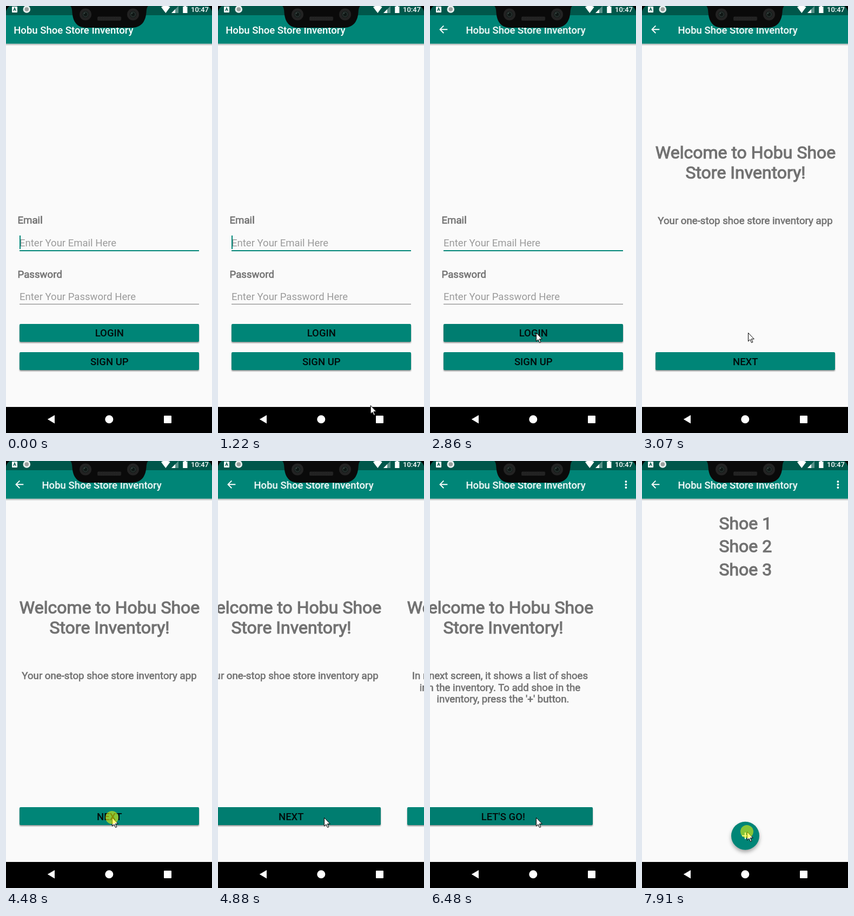
These frames come from a looping animation (381x787 px, 8000 ms). An HTML page:

```html
<!DOCTYPE html>
<html lang="en">
<head>
<meta charset="utf-8">
<title>Shoe inventory app</title>
<style>
  html, body { margin: 0; width: 100%; height: 100%; overflow: hidden; background: #fafafa; }
  svg { display: block; width: 100%; height: 100%; font: 18.54px Roboto, "Open Sans", sans-serif; }

  .bold { fill: #727272; stroke: #727272; stroke-width: .035em; font-size: 18.66px; }
  .big { font-size: 32px; }
  .mid { text-anchor: middle; }
  .hint { fill: #9b9b9b; }
  .label { fill: #020b0a; font-weight: 500; text-anchor: middle; }
  .title { fill: #fff; font-weight: 500; }
  .clock { fill: #fff; font-size: 13px; font-weight: 500; }

  .btn { fill: #008577; filter: drop-shadow(0 2px 1px rgba(0,0,0,.4)); }
  .fab { fill: #008577; filter: drop-shadow(0 4px 3.5px rgba(0,0,0,.34)); }

  .strip, .caret, .name, .back, .more, .tap { animation: 8s step-end infinite; }
  .strip { animation-name: strip; }
  .caret { animation-name: caret; }
  .name { animation-name: name; }
  .back { animation-name: back; }
  .more { animation-name: more; }
  .tap { animation-name: tap; }
  .press { opacity: 0; animation: press 8s step-end var(--at) infinite; }
  .mouse { animation: mouse 8s linear infinite; }

  @keyframes strip {
    0% { transform: translateX(0); }
    36.625% { transform: translateX(-56px); }
    37.5% { transform: translateX(-262px); }
    38.375% { transform: translateX(-381px); }
    60.875% { transform: translateX(-437px); }
    61.75% { transform: translateX(-643px); }
    62.625% { transform: translateX(-762px); }
    81% { transform: translateX(-818px); }
    81.875% { transform: translateX(-1024px); }
    82.75%, 100% { transform: translateX(-1143px); }
  }
  @keyframes caret {
    0%, 11%, 23.1%, 36% { opacity: 1; }
    4.125%, 16.9%, 29.875% { opacity: 0; }
    100% { opacity: 1; }
  }
  @keyframes name {
    0% { transform: translateX(14.2px); }
    35.75%, 100% { transform: translateX(66.4px); }
  }
  @keyframes back {
    0% { opacity: 0; }
    35.75%, 100% { opacity: 1; }
  }
  @keyframes more {
    0% { opacity: 0; }
    80.125%, 100% { opacity: 1; }
  }
  @keyframes tap {
    0%, 34%, 57.625%, 77.5% { opacity: 0; }
    32.375%, 56%, 75.875%, 98.875%, 100% { opacity: 1; }
  }
  @keyframes press {
    0% { opacity: .06; }
    3.5%, 100% { opacity: 0; }
  }
  @keyframes mouse {
    0% { transform: translate(318px, 790px); }
    11% { transform: translate(318px, 790px); animation-timing-function: steps(11); }
    20.5% { transform: translate(218px, 641px); animation-timing-function: steps(6); }
    25.625% { transform: translate(202px, 607px); animation-timing-function: steps(4); }
    28.9% { transform: translate(196px, 602px); }
    46.8% { transform: translate(196px, 602px); animation-timing-function: steps(5); }
    51% { transform: translate(196px, 657px); }
    92.9% { transform: translate(196px, 657px); animation-timing-function: steps(4); }
    96.375%, 100% { transform: translate(194px, 683px); }
  }
</style>
</head>
<body>
<svg viewBox="0 0 381 787" preserveAspectRatio="none">
  <defs>
    <linearGradient id="shade" x2="0" y2="1">
      <stop offset="0" stop-color="#000" stop-opacity=".3"/>
      <stop offset="1" stop-color="#000" stop-opacity="0"/>
    </linearGradient>
    <pattern id="mesh" width="3" height="3" patternUnits="userSpaceOnUse">
      <rect width="3" height="3" fill="#171717"/>
      <path d="M0 0L3 3M3 0L0 3" stroke="#333" stroke-width=".7"/>
    </pattern>
    <g id="lens">
      <circle r="11" fill="#232323"/>
      <circle r="6.5" fill="#161b1a"/>
      <circle r="4.5" fill="none" stroke="#30403c" stroke-width="1"/>
      <circle r="2" fill="#0b1512"/>
      <circle cx="-2" cy="-2" r="1" fill="#4a5a55"/>
    </g>
    <rect id="bar" x="25" width="332" height="33" rx="2"/>
    <g id="welcome" class="bold big mid">
      <text x="191.5" y="280.5">Welcome to Hobu Shoe</text>
      <text x="191.5" y="318">Store Inventory!</text>
    </g>
  </defs>

  <rect width="381" height="787" fill="#fafafa"/>

  <g class="strip">
    <!-- login -->
    <g>
      <text class="bold" x="21.5" y="401">Email</text>
      <text class="hint" x="25" y="443">Enter Your Email Here</text>
      <rect x="25" y="450" width="332" height="2" fill="#008577"/>
      <rect class="caret" x="25" y="423" width="2" height="25" fill="#008577"/>
      <text class="bold" x="21.5" y="500.5">Password</text>
      <text class="hint" x="25" y="542">Enter Your Password Here</text>
      <rect x="25" y="549" width="332" height="1" fill="#777"/>
      <use href="#bar" y="586" class="btn"/>
      <use href="#bar" y="586" class="press" style="--at:2860ms"/>
      <text class="label" x="191.3" y="609">LOGIN</text>
      <use href="#bar" y="638" class="btn"/>
      <text class="label" x="191.3" y="661.5">SIGN UP</text>
    </g>

    <!-- welcome -->
    <g transform="translate(381)">
      <use href="#welcome"/>
      <text class="bold mid" x="191" y="401.7">Your one-stop shoe store inventory app</text>
      <use href="#bar" y="638" class="btn"/>
      <use href="#bar" y="638" class="press" style="--at:4740ms"/>
      <text class="label" x="191.3" y="661.5">NEXT</text>
    </g>

    <!-- instructions -->
    <g transform="translate(762)">
      <use href="#welcome"/>
      <g class="bold mid">
        <text x="191" y="401.7">In next screen, it shows a list of shoes</text>
        <text x="191" y="423.5">in the inventory. To add shoe in the</text>
        <text x="191" y="445.3">inventory, press the '+' button.</text>
      </g>
      <use href="#bar" y="638" class="btn"/>
      <use href="#bar" y="638" class="press" style="--at:6340ms"/>
      <text class="label" x="191.3" y="661.5">LET'S GO!</text>
    </g>

    <!-- list -->
    <g transform="translate(1143)">
      <g class="bold big mid">
        <text x="191.3" y="125.7">Shoe 1</text>
        <text x="191.3" y="168.2">Shoe 2</text>
        <text x="191.3" y="210.7">Shoe 3</text>
      </g>
      <circle class="fab" cx="191" cy="690.7" r="26"/>
      <path d="M185 690.7h12M191 684.7v12" stroke="#fff" stroke-width="2"/>
    </g>
  </g>

  <!-- app bar -->
  <rect y="69.5" width="381" height="4" fill="url(#shade)"/>
  <rect width="381" height="69.5" fill="#008577"/>
  <rect width="381" height="17" fill="#00574b"/>
  <text class="title name" y="50.7">Hobu Shoe Store Inventory</text>
  <path class="back" d="M32.3 43.2H18.8M25.3 36.4L18.5 43.2L25.3 50" fill="none" stroke="#fff" stroke-width="1.9"/>
  <g class="more" fill="#fff">
    <circle cx="362.4" cy="38" r="1.9"/>
    <circle cx="362.4" cy="43.5" r="1.9"/>
    <circle cx="362.4" cy="49" r="1.9"/>
  </g>

  <!-- status bar -->
  <rect x="11" y="1" width="10" height="11" rx="1" fill="#fff"/>
  <path d="M13.6 9L16 3.2L18.4 9M14.5 7.2h3" fill="none" stroke="#00574b" stroke-width="1.2"/>
  <circle cx="38.3" cy="6" r="6.8" fill="#e8efee"/>
  <circle cx="38.3" cy="6" r="3.8" fill="#9a9f9e"/>
  <path d="M287 2Q295.3-4 303.6 2L295.3 13Z" fill="#fff"/>
  <path d="M306 13L319 0V13Z" fill="#fff" opacity=".35"/>
  <path d="M306 13L313 6V13Z" fill="#fff"/>
  <path d="M327.2 1H329.5V0H333V1H335.5V13H327.2Z" fill="#fff"/>
  <text class="clock" x="342" y="11">10:47</text>

  <!-- notch and corners -->
  <path d="M119 0Q122 2 122.5 12C124 30 132 40 149 40H232C249 40 258 30 259.5 12Q260 2 263 0Z" fill="#0a0a0a"/>
  <use href="#lens" x="147" y="15.5"/>
  <use href="#lens" x="235" y="15.5"/>
  <rect x="169" y="19.5" width="44" height="7.5" rx="2" fill="url(#mesh)"/>
  <path d="M0 0H7Q2 3 0 10ZM381 0H374Q379 3 381 10Z" fill="#000"/>

  <!-- navigation bar -->
  <rect y="739" width="381" height="48"/>
  <path d="M76.8 761.7L90 753.9V769.5Z" fill="#fff"/>
  <circle cx="190.8" cy="761.7" r="7.5" fill="#fff"/>
  <rect x="292" y="755" width="14" height="14" rx="1" fill="#fff"/>

  <g class="mouse">
    <path d="M.5.5V16L4 12.7L6.6 18.5L8.9 17.5L6.3 11.8H11.3Z" fill="#fff" stroke="#000" stroke-width="1"/>
    <circle class="tap" r="12" fill="#ff0" fill-opacity=".53"/>
  </g>
</svg>
</body>
</html>
```
